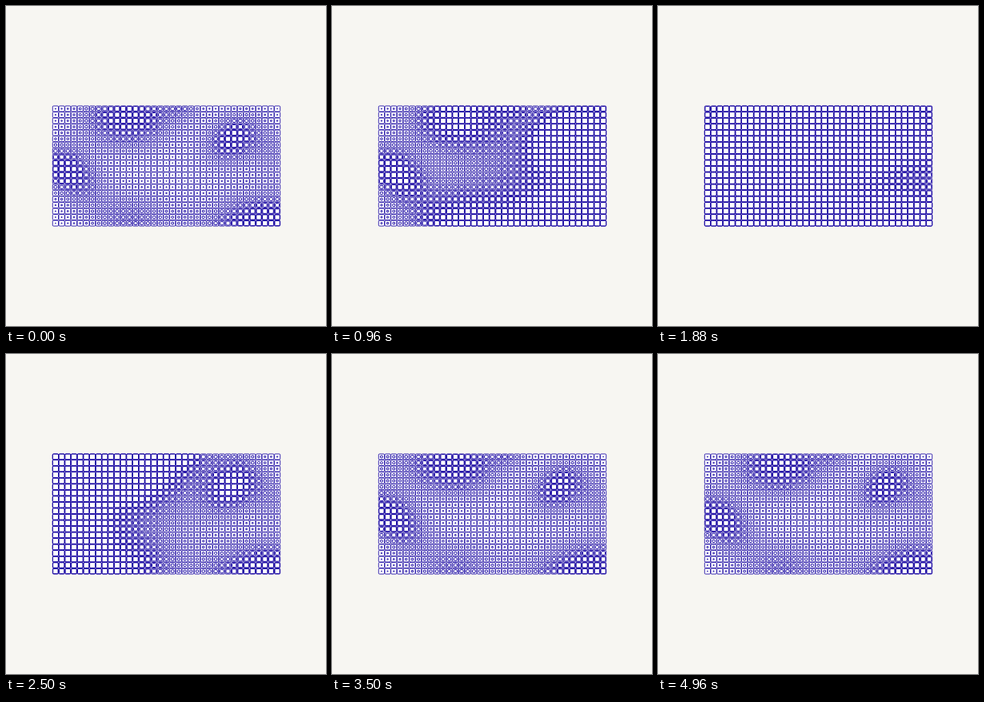
Write an HTML page that moves like this. It is 400 px wide and 400 px high and loops after 5 s.

```html
<!DOCTYPE html>
<html lang="en">
<head>
<meta charset="utf-8">
<title>Pulsing grid</title>
<style>
  html, body { margin: 0; width: 100%; height: 100%; overflow: hidden; background: #f7f6f2; }
  svg { display: block; width: 100%; height: 100%; }
</style>
</head>
<body>
<svg id="stage" viewBox="0 0 400 400"></svg>
<script>
const LOOP = 5000;
const COLS = 37, ROWS = 20;
const PITCH_X = 7.7, PITCH_Y = 7.53;
const CELL_W = 7.2, CELL_H = 7.05;
const INK = '#1806a2';

// Soft hills that set the resting size of the inner squares.
const HILLS = [
  { x: 152, y: 140, rx: 60, ry: 39, tilt: 0, height: .85 },
  { x: 222, y: 126, rx: 22, ry: 14, tilt: 0, height: .35 },
  { x: 76, y: 207, rx: 43, ry: 29, tilt: 35, height: .86 },
  { x: 283, y: 166, rx: 38, ry: 28, tilt: -40, height: .82 },
  { x: 318, y: 272, rx: 75, ry: 40, tilt: -8, height: .86 },
  { x: 155, y: 268, rx: 60, ry: 38, tilt: 0, height: .5 },
  { x: 335, y: 180, rx: 30, ry: 30, tilt: 0, height: .35 }
];

function hillAt({ x, y, rx, ry, tilt, height }, px, py) {
  const a = tilt * Math.PI / 180, dx = px - x, dy = py - y;
  const along = (dx * Math.cos(a) + dy * Math.sin(a)) / rx;
  const across = (dy * Math.cos(a) - dx * Math.sin(a)) / ry;
  return height * Math.exp(-along * along - across * across);
}

const restSize = (x, y) =>
  Math.min(.87, HILLS.reduce((sum, hill) => sum + hillAt(hill, x, y), .06));

const stage = document.getElementById('stage');

function addRect(strokeWidth, fill) {
  const rect = document.createElementNS('http://www.w3.org/2000/svg', 'rect');
  rect.setAttribute('fill', fill);
  rect.setAttribute('stroke', INK);
  rect.setAttribute('stroke-width', strokeWidth);
  stage.appendChild(rect);
  return rect;
}

function place(rect, cx, cy, scale) {
  const w = CELL_W * scale, h = CELL_H * scale;
  const box = { x: cx - w / 2, y: cy - h / 2, width: w, height: h, rx: Math.min(1.2, w * .25) };
  for (const key in box) rect.setAttribute(key, box[key].toFixed(3));
}

const cells = [];
for (let row = 0; row < ROWS; row++) {
  for (let col = 0; col < COLS; col++) {
    const x = 200.5 + (col - (COLS - 1) / 2) * PITCH_X;
    const y = 200 + (row - (ROWS - 1) / 2) * PITCH_Y;
    // The swell travels from the bottom right to the top left.
    const travel = .72 * (1 - col / (COLS - 1)) + .28 * (1 - row / (ROWS - 1));
    place(addRect(.85, '#fff'), x, y, 1);
    cells.push({
      x, y,
      rest: restSize(x, y),
      start: 1050 * travel ** 1.2 - 100,
      length: 2400 + 650 * travel,
      inner: addRect(1, 'none')
    });
  }
}

function swell(cell, time) {
  const age = (time - cell.start + LOOP) % LOOP;
  return age < cell.length ? Math.sin(Math.PI * age / cell.length) ** 2 : 0;
}

function draw(time) {
  for (const cell of cells) {
    place(cell.inner, cell.x, cell.y, Math.min(1, cell.rest + swell(cell, time)));
  }
}

const origin = performance.now();
function frame() {
  draw((performance.now() - origin) % LOOP);
  requestAnimationFrame(frame);
}
frame();
</script>
</body>
</html>
```
